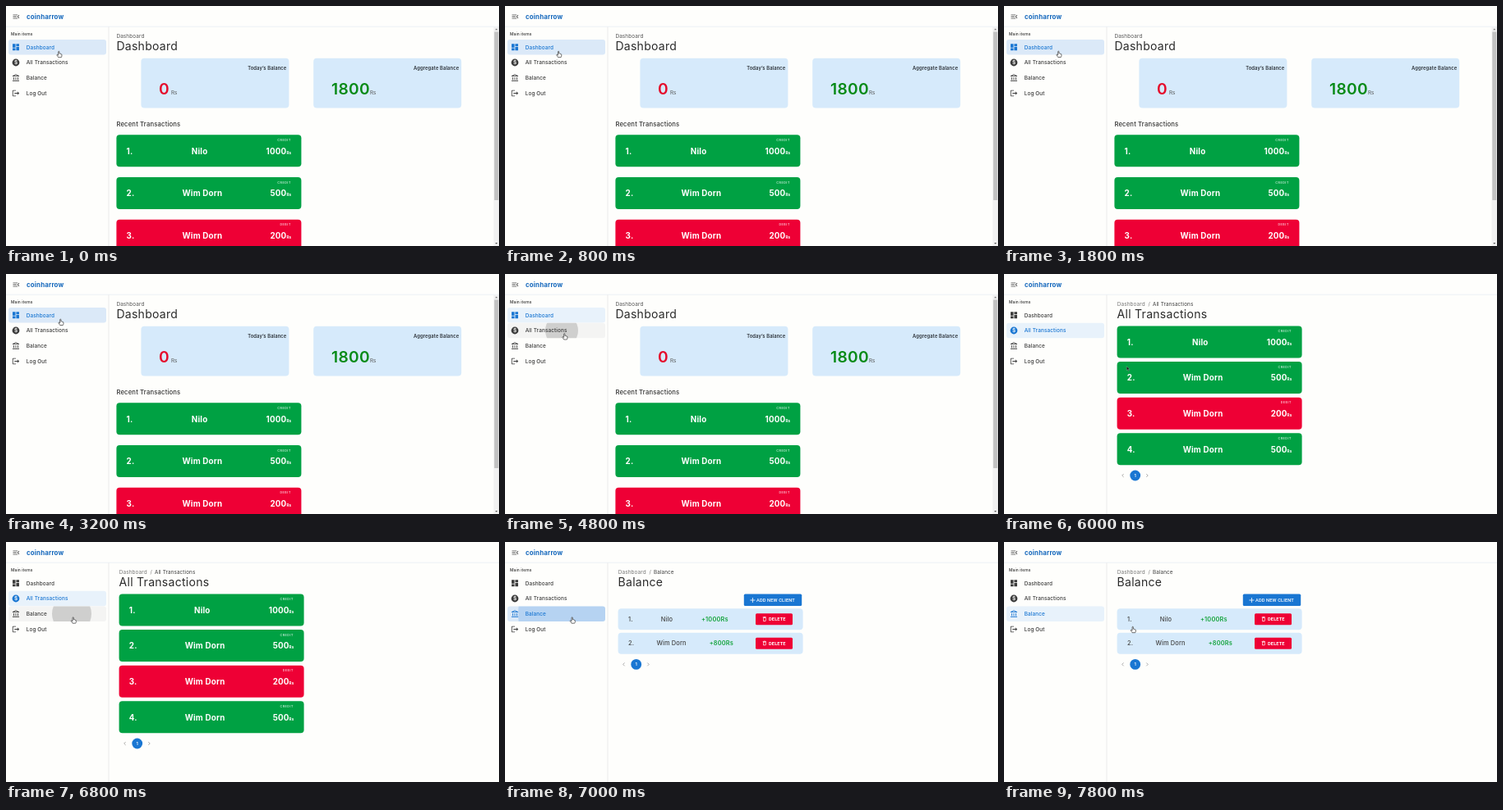
These frames come from a looping animation (600 px wide and 293 px high, 8000 ms). An HTML page:

```html
<!DOCTYPE html>
<html lang="en">
<head>
<meta charset="utf-8">
<title>Dashboard</title>
<style>
  html, body { margin: 0; width: 100%; height: 100%; overflow: hidden; background: #fefefc; }
  svg { display: block; width: 100%; height: 100%; }
  text { font-family: Inter, "Open Sans", sans-serif; letter-spacing: .02em; white-space: pre; }
  .button { font-family: Roboto, sans-serif; }
</style>
</head>
<body>
<svg id="stage" viewBox="0 0 600 293"></svg>
<script>
const BLUE = '#1976d2', GREEN = '#00a143', RED = '#ee0035', PALE = '#d6eafb', INK = '#333';
const BRAND = 'coinharrow', CLIENT_A = 'Nilo', CLIENT_B = 'Wim Dorn';
const LOOP = 8000, STEP = 200, ROW_H = 18.6;

const text = (x, y, str, size, weight = 400, fill = INK, attrs = '') =>
  `<text x="${x}" y="${y}" font-size="${size}" font-weight="${weight}" fill="${fill}" ${attrs}>${str}</text>`;
const rect = (x, y, w, h, fill, r = 0, attrs = '') =>
  `<rect x="${x}" y="${y}" width="${w}" height="${h}" rx="${r}" fill="${fill}" ${attrs}/>`;
const icon = (cx, cy, size, d, attrs = '') =>
  `<path transform="translate(${cx - size / 2} ${cy - size / 2}) scale(${size / 24})" d="${d}" ${attrs}/>`;
const MIDDLE = 'text-anchor="middle"', END = 'text-anchor="end"';

const ICONS = {
  menu: 'M3 18h13v-2H3zm0-5h10v-2H3zm0-7v2h13V6zm18 9.6L17.4 12 21 8.4 19.6 7l-5 5 5 5z',
  dashboard: 'M3 13h8V3H3zm0 8h8v-6H3zm10 0h8V11h-8zm0-18v6h8V3z',
  bank: 'M6.5 10h-2v7h2zm6 0h-2v7h2zM21 19H2v2h19zm-2.5-9h-2v7h2zM11.5 1 2 6v2h19V6zm0 2.3L16.7 6H6.3z',
  logout: 'M17 7l-1.4 1.4L18.2 11H8v2h10.2l-2.6 2.6L17 17l5-5zM4 5h8V3H4c-1.1 0-2 .9-2 2v14c0 1.1.9 2 2 2h8v-2H4z',
  bin: 'M6 19c0 1.1.9 2 2 2h8c1.1 0 2-.9 2-2V7H6zM8 9h8v10H8zm7.5-5-1-1h-5l-1 1H5v2h14V4z'
};

const menuItems = [
  { label: 'Dashboard', y: 50.2 },
  { label: 'All Transactions', y: 69 },
  { label: 'Balance', y: 87.8 },
  { label: 'Log Out', y: 106.5 }
];
const menuIcons = [
  icon(12, 50.2, 10.6, ICONS.dashboard),
  `<circle cx="12" cy="69" r="4.4"/>` + text(12.1, 71.3, '$', 6.4, 600, '#fefefc', MIDDLE),
  icon(12.2, 87.8, 10.2, ICONS.bank, 'fill-rule="evenodd"'),
  icon(12, 106.5, 10, ICONS.logout)
];

const heading = (x, title) => text(x, 53.7, title, 14, 400, '#2b2b2b');
const crumbs = title => text(137.7, 38.6, 'Dashboard', 6.4, 400, '#777') +
  text(175.5, 38.6, '/', 6.4, 400, '#777') + text(181, 38.6, title, 6.3, 400, '#3c3c3c');

const summary = (x, label, value, color, unitX) => rect(x, 63.7, 180, 60.8, PALE, 4) +
  text(x + 177, 78, label, 5.8, 600, '#2c3238', END) +
  text(x + 21.7, 108, value, 19.2, 600, color) + text(unitX, 108, 'Rs', 6.2, 400, '#555');

function transaction(x, y, index, name, amount, kind = 'CREDIT') {
  const nameX = x + (name === CLIENT_A ? 101.2 : 104.5);
  return rect(x, y, 225, 39, kind === 'CREDIT' ? GREEN : RED, 4) +
    text(x + 212.5, y + 7.6, kind, 3.6, 700, '#fff', END + ' opacity=".7" style="letter-spacing:.16em"') +
    text(x + 12.2, y + 23.3, index + '.', 9.8, 700, '#fff') +
    text(nameX, y + 23.3, name, 9.8, 700, '#fff', MIDDLE) +
    text(x + 213, y + 23.3, amount + '<tspan font-size="4.6">Rs</tspan>', 9.8, 700, '#fff', END);
}

const chevron = (x, y, dir) =>
  `<path d="M${x - dir} ${y - 1.9}l${1.9 * dir} 1.9l${-1.9 * dir} 1.9" fill="none" stroke="#888" stroke-width=".7"/>`;
const pager = y => chevron(144.6, y, -1) + `<circle cx="159.7" cy="${y}" r="6.4" fill="${BLUE}"/>` +
  text(159.7, y + 2, '1', 5.4, 600, '#fff', MIDDLE) + chevron(174.3, y, 1);

const clientRow = (y, index, name, amount, nameX, amountX) => rect(137.6, y, 225, 26, PALE, 4) +
  text(150, y + 15.5, index + '.', 7.4, 500, '#444') +
  text(nameX, y + 15.5, name, 7.4, 500, '#444', MIDDLE) +
  text(amountX, y + 15.5, amount, 7.4, 600, '#16a43e', MIDDLE) +
  rect(305, y + 6, 45, 14, RED, 1.5) + icon(315.8, y + 12.8, 7.2, ICONS.bin, 'fill="#fff" fill-rule="evenodd"') +
  text(321, y + 15, 'DELETE', 5.7, 700, '#fff', 'class="button"');

const scrollbar = rect(593.5, 25.5, 6.5, 267.5, '#f1f1f1') + rect(594.3, 31.5, 5, 205.5, '#c1c1c1') +
  '<path d="M595.3 29.3l1.5-1.8 1.5 1.8z" fill="#777"/><path d="M595.3 289l1.5 1.8 1.5-1.8z" fill="#555"/>';

const pages = [
  text(134.4, 38.6, 'Dashboard', 6.4, 400, '#555') + heading(134.4, 'Dashboard') +
    summary(164.4, 'Today’s Balance', '0', '#e50c2b', 201) +
    summary(374.2, 'Aggregate Balance', '1800', '#078a16', 443) +
    text(134.4, 146.6, 'Recent Transactions', 7.7, 500, '#333') +
    transaction(134.4, 157.2, 1, CLIENT_A, 1000) +
    transaction(134.4, 209, 2, CLIENT_B, 500) +
    transaction(134.4, 260.8, 3, CLIENT_B, 200, 'DEBIT') + scrollbar,
  crumbs('All Transactions') + heading(137.6, 'All Transactions') +
    transaction(137.6, 63.5, 1, CLIENT_A, 1000) +
    transaction(137.6, 107.1, 2, CLIENT_B, 500) +
    transaction(137.6, 150.7, 3, CLIENT_B, 200, 'DEBIT') +
    transaction(137.6, 194.3, 4, CLIENT_B, 500) + pager(246),
  crumbs('Balance') + heading(137.6, 'Balance') +
    rect(290.8, 63.6, 70.4, 14.5, BLUE, 1.6) +
    '<path d="M298.4 71h6M301.4 68v6" stroke="#fff" stroke-width=".8"/>' +
    text(306, 73, 'ADD NEW CLIENT', 5.7, 500, '#fff', 'class="button"') +
    clientRow(81.2, 1, CLIENT_A, '+1000Rs', 197, 255.3) +
    clientRow(110.7, 2, CLIENT_B, '+800Rs', 202.5, 263.3) + pager(149.4)
];

const stage = document.getElementById('stage');
stage.innerHTML = rect(0, 0, 600, 293, '#fefefc') +
  '<path d="M0 25.2H600" stroke="#e4ebf1" stroke-width=".7"/><path d="M125 25.5V293" stroke="#e4e4e4" stroke-width=".7"/>' +
  icon(12.4, 13, 10.4, ICONS.menu, 'fill="#555"') + text(25, 15.6, BRAND, 7.9, 700, '#1769bd') +
  text(6, 36.2, 'Main items', 4.9, 500, '#333') +
  `<clipPath id="row">${rect(3, 0, 119, ROW_H, '#000', 3, 'id="rowClip"')}</clipPath>` +
  menuItems.map(({ y }) => rect(3, y - ROW_H / 2, 119, ROW_H, 'none', 3, 'class="back"')).join('') +
  '<g clip-path="url(#row)"><circle id="ripple"/></g>' +
  menuItems.map(({ label, y }, i) =>
    `<g class="item">${menuIcons[i]}${text(24.7, y + 2.3, label, 6.4, 500, 'inherit')}</g>`).join('') +
  pages.map(page => `<g class="page">${page}</g>`).join('') +
  `<path id="hand" d="M-.9 .3V-3Q-.9-3.7-.3-3.7T.3-3V-.9Q1.2-1.3 1.4-.6Q2.2-.9 2.4-.1Q3.3-.3 3.3.6V2Q3.2 3 2.7 3.7H-.9Q-1.5 2.6-2.7 1.1Q-2.8.1-1.8.4L-.9 1.2Z"
    fill="#fff" stroke="#222" stroke-width=".65" stroke-linejoin="round"/>` +
  `<path id="arrow" d="M-1.7-2.8V2.1L-.6 1.1 .2 2.9 1.1 2.5 .3.8H1.9Z" fill="#111" stroke="#ddd" stroke-width=".3"/>`;

const find = id => document.getElementById(id);
const backs = stage.querySelectorAll('.back'), items = stage.querySelectorAll('.item');
const pageNodes = stage.querySelectorAll('.page');

// Pointer stops: time, x, y
const pointerPath = [
  [0, 64.6, 59], [1800, 66.6, 58.8], [3400, 66.6, 58.8], [4600, 72.6, 76.3], [4800, 72.6, 76.3],
  [5000, 72.6, 74.6], [5200, 72.6, 74.6], [5800, 151, 115.5], [6000, 151, 115.5],
  [6600, 82, 95.5], [7100, 82, 95.5], [7600, 157, 107], [8000, 157, 107]
];
const clicks = [{ time: 4700, x: 69, row: 1 }, { time: 6680, x: 80, row: 2 }];

function pointerAt(t) {
  const i = pointerPath.findIndex(stop => stop[0] > t);
  const [t0, x0, y0] = pointerPath[i - 1], [t1, x1, y1] = pointerPath[i];
  const p = (t - t0) / (t1 - t0), eased = p * p * (3 - 2 * p);
  return [x0 + (x1 - x0) * eased, y0 + (y1 - y0) * eased];
}

function draw(t) {
  const current = t < 5000 ? 0 : t < 7000 ? 1 : 2;
  const [x, y] = pointerAt(t);
  const hovered = x < 122 ? menuItems.findIndex(item => Math.abs(item.y - (y - 2.5)) < ROW_H / 2) : -1;

  pageNodes.forEach((node, i) => node.style.display = i === current ? '' : 'none');
  menuItems.forEach((_, i) => {
    const over = i === hovered;
    backs[i].setAttribute('fill', i === current ? (over ? '#dbe9f8' : '#e8f2fb') : over ? '#f4f4f3' : 'none');
    items[i].setAttribute('fill', i === current ? BLUE : '#3b3b3b');
  });

  const click = clicks.find(c => t >= c.time && t < c.time + 850);
  const ripple = find('ripple');
  ripple.style.display = click ? '' : 'none';
  if (click) {
    const age = t - click.time, rowY = menuItems[click.row].y;
    find('rowClip').setAttribute('y', rowY - ROW_H / 2);
    ripple.setAttribute('cx', click.x);
    ripple.setAttribute('cy', rowY);
    ripple.setAttribute('r', age * .2);
    ripple.setAttribute('fill', current === click.row ? BLUE : '#333');
    ripple.setAttribute('opacity', .19 * Math.min(1, (850 - age) / 530));
  }

  const overClient = current === 2 && x > 137 && y > 81 && y < 137;
  const pointing = hovered >= 0 || overClient;
  find('hand').style.display = pointing ? '' : 'none';
  find('arrow').style.display = pointing ? 'none' : '';
  for (const id of ['hand', 'arrow']) find(id).setAttribute('transform', `translate(${x} ${y})`);
}

const start = performance.now();
function tick() {
  const t = (performance.now() - start) % LOOP;
  draw(Math.floor(t / STEP) * STEP);
  requestAnimationFrame(tick);
}
tick();
</script>
</body>
</html>
```
